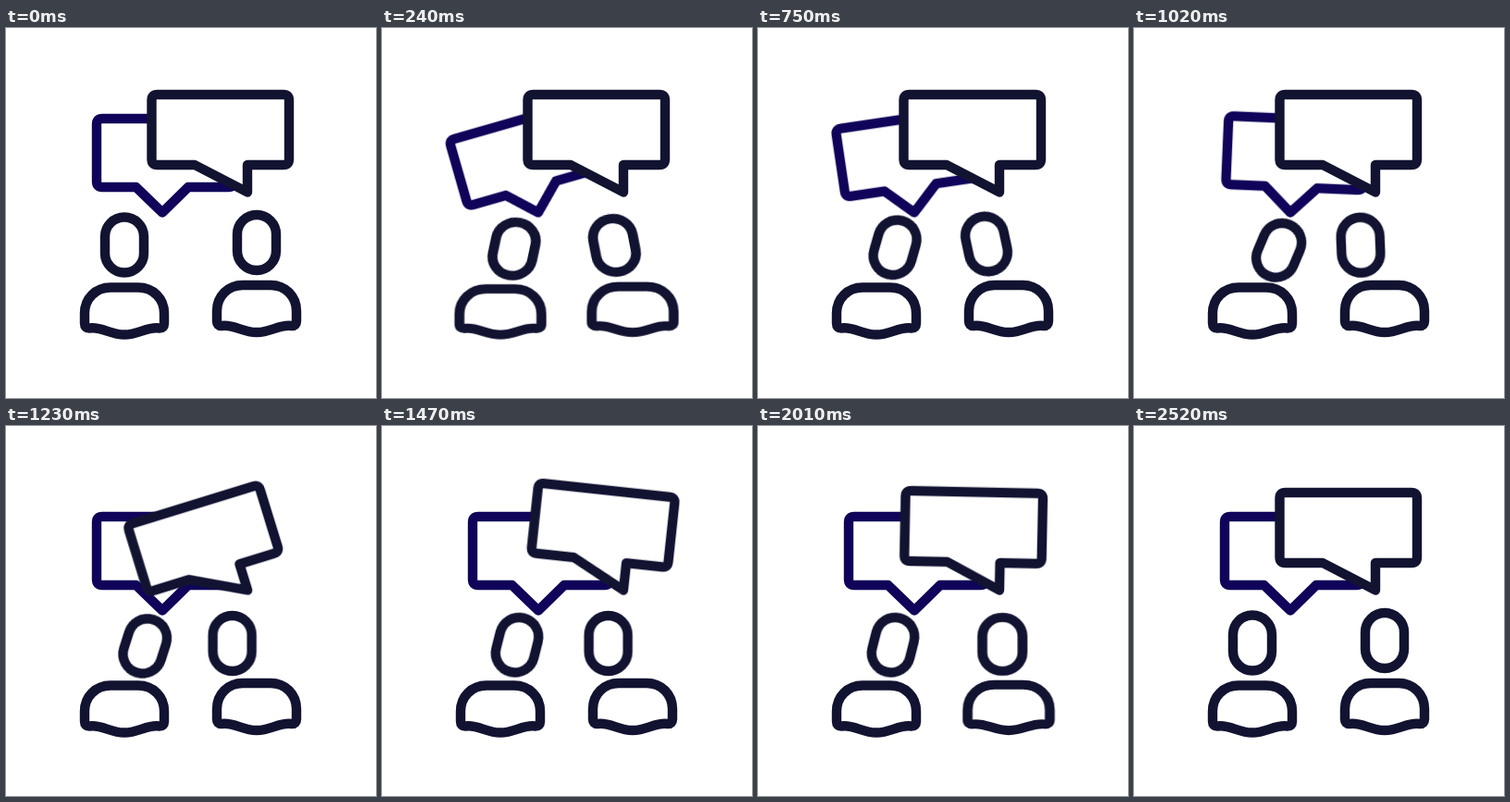
Write an HTML page without scripts that moves like this. It is 400 px wide and 400 px high and loops after 4.55 s.

```html
<!DOCTYPE html>
<html lang="en">
<head>
<meta charset="utf-8">
<title>Conversation</title>
<style>
  html, body { margin: 0; width: 100%; height: 100%; overflow: hidden; background: #fff; }
  svg { display: block; width: 100%; height: 100%; }
  .ink { fill: none; stroke: #121331; stroke-width: 10.4; stroke-linecap: round; stroke-linejoin: round; }
  .ink * { animation: 4550ms ease-in-out infinite; }

  .back { stroke: #10045a; transform-origin: 169px 200px; animation-name: wobble; }
  .front { fill: #fff; transform-origin: 261px 177px; animation-name: wobble; animation-delay: 1110ms; }
  .left { transform-origin: 128px 334px; animation-name: squash-left; }
  .right { transform-origin: 271px 332px; animation-name: squash-right; }
  .left .head { transform-origin: 128px 308px; animation-name: lean; }
  .right .head { transform-origin: 271px 232px; animation-name: listen; }

  @keyframes wobble {
    0%, 26.4%, 100% { transform: rotate(0deg); }
    3.7% { transform: rotate(-20.5deg); }
    10.1% { transform: rotate(14.5deg); }
    16.2% { transform: rotate(-8.5deg); }
    21.1% { transform: rotate(2.8deg); }
  }
  @keyframes lean {
    0%, 53.4%, 100% { transform: rotate(0deg); }
    7.7%, 13.2% { transform: rotate(14.2deg); }
    24.4% { transform: rotate(23.5deg); }
    29%, 45.1% { transform: rotate(14.2deg); }
  }
  @keyframes listen {
    0%, 46.2%, 100% { transform: translate(0, 0) rotate(0deg); }
    7.7%, 13.2% { transform: translate(-24px, 0) rotate(-13deg); }
    16.5% { transform: translate(-24px, 1.5px) rotate(-12deg); }
    25%, 40.4% { transform: translate(-26.4px, 3px) rotate(0deg); }
  }
  @keyframes squash-left {
    0%, 7.7%, 45.1%, 53.4%, 100% { transform: scale(1, 1); }
    4%, 48.8% { transform: scale(1.04, .96); }
  }
  @keyframes squash-right {
    0%, 7.7%, 40.4%, 46.8%, 100% { transform: scale(1, 1); }
    4%, 43.1% { transform: scale(1.04, .96); }
  }
</style>
</head>
<body>
<svg viewBox="0 0 400 400">
  <defs>
    <rect id="head" x="-21" y="-30" width="42" height="60" rx="21"/>
    <path id="body" d="M-38 324q-5 0-5-5V308C-43 292-31 280-15 280H15C31 280 43 292 43 308V319q0 5-5 5C24 322 16 331 0 331S-24 322-38 324Z"/>
  </defs>
  <g class="ink">
    <path class="back" d="M104 98H240.500q6 0 6 6V166q0 6-6 6H197L169 199.500 140.500 172H104q-6 0-6-6V104q0-6 6-6Z"/>
    <path class="front" d="M163.500 72H300q6 0 6 6V142q0 6-6 6H261V177.500L204 148H163.500q-6 0-6-6V78q0-6 6-6Z"/>
    <g class="left">
      <g class="head"><use href="#head" x="128" y="234.500"/></g>
      <use href="#body" x="128" y=".5"/>
    </g>
    <g class="right">
      <g class="head"><use href="#head" x="271" y="232"/></g>
      <use href="#body" x="271" y="-2"/>
    </g>
  </g>
</svg>
</body>
</html>
```
